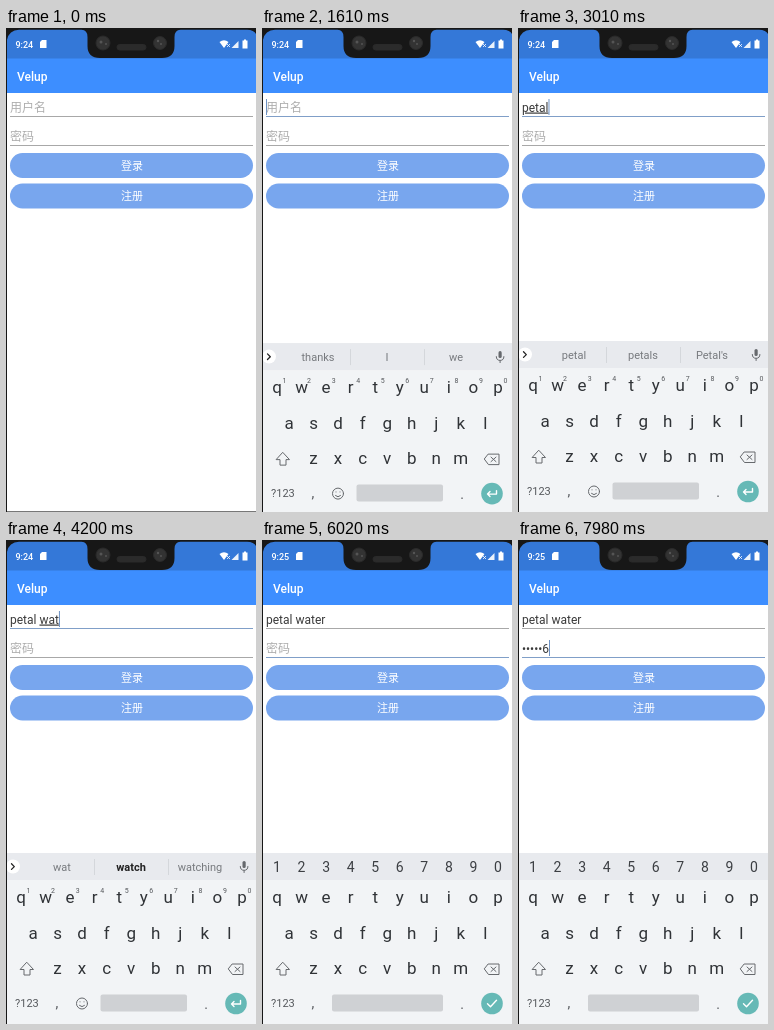
Animation of 250x484 px, one loop 8 s. Source, as an HTML page:

```html
<!DOCTYPE html>
<html lang="zh">
<head>
<meta charset="utf-8">
<style>
  html, body { margin: 0; width: 100%; height: 100%; overflow: hidden; background: #fff; }
  svg { display: block; width: 250px; height: 484px; }
  text { font-family: Roboto, "Noto Sans CJK SC", "Noto Sans CJK", sans-serif; white-space: pre; }
  .mid { text-anchor: middle; }
  .key { font-size: 17px; fill: #303337; }
  .hint { fill: #adadad; }
  .field { font-size: 12px; fill: #3a3a3a; }
  .icon { fill: none; stroke: #66696d; stroke-width: 1; stroke-linejoin: round; stroke-linecap: round; }
  .on { stroke: #fff; stroke-width: 1.4; }
  .composing { text-decoration: underline #777; text-decoration-thickness: 1px; text-underline-offset: 2px; }
</style>
</head>
<body>
<svg viewBox="0 0 250 484">
  <rect width="250" height="484" fill="#fff"/>
  <rect width="250" height="31" fill="#3478d8"/>
  <rect y="30.500" width="250" height="34.500" fill="#3d8eff"/>
  <text x="11" y="53" font-size="12" font-weight="500" fill="#fff">Velup</text>

  <g fill="#fff">
    <text id="clock" x="9.500" y="19.500" font-size="9" font-weight="500"></text>
    <path d="M36 12H40.500V20H34V14Z"/>
    <path d="M213.500 14Q218 10.500 222.500 14L218 20Z"/>
    <path d="M225.500 20L232.500 13V20Z" fill-opacity=".9"/>
    <path d="M236.500 12.500H238V11.500H240V12.500H241.500V20.500H236.500Z"/>
  </g>
  <path d="M221 16l3 3m0-3l-3 3" stroke="#fff" stroke-width=".8"/>

  <text id="name" class="field" x="4" y="83.500"></text>
  <text id="secret" class="field" x="4" y="112.500"></text>
  <path id="nameLine" d="M4 88.500H247"/>
  <path id="secretLine" d="M4 117.500H247"/>
  <path id="caret" stroke="#6d92c4"/>
  <g fill="#78a6ee">
    <rect x="4" y="125" width="243" height="25" rx="12.500"/>
    <rect x="4" y="155.500" width="243" height="25" rx="12.500"/>
  </g>
  <g class="mid" font-size="11" fill="#fff"><text x="126" y="142">登录</text><text x="126" y="172">注册</text></g>
  <path d="M1 483.500H250" stroke="#777"/>

  <g id="keyboard">
    <rect y="313" width="250" height="171" fill="#f2f4f6"/>
    <rect y="313" width="250" height="27" fill="#e8eaee"/>
    <g id="letters"></g>
    <path class="icon" d="M21 422.500L27.500 429.500H24V435H18V429.500H14.500Z"/>
    <path class="icon" d="M226.500 424H237V434.500H226.500L222.500 429.200ZM229 427l5 4.500m0-4.500l-5 4.500"/>
    <text x="9" y="467" font-size="11" fill="#55585c">?123</text>
    <text class="mid" x="51" y="468" font-size="14" fill="#55585c">,</text>
    <text class="mid" x="200" y="468.500" font-size="14" fill="#55585c">.</text>
    <rect id="space" y="454.500" height="17" rx="2" fill="#cfd1d4"/>
    <circle cx="230" cy="463.500" r="10.800" fill="#66b9b6"/>
    <g id="wordMode">
      <g id="hints"></g>
      <circle cx="7" cy="326.500" r="7" fill="#fff"/>
      <path class="icon" d="M5.500 323.800l2.800 2.800-2.800 2.800" style="stroke:#222;stroke-width:1.300"/>
      <path d="M88.500 319V335M162.500 319V335" stroke="#d4d7db"/>
      <g id="words" class="mid" font-size="11" fill="#777a7e"></g>
      <rect x="236.500" y="321" width="3.200" height="7" rx="1.600" fill="#66696d"/>
      <path class="icon" d="M234.300 326.500a3.800 3.800 0 0 0 7.600 0M238.100 330.500V332.500"/>
      <circle class="icon" cx="76" cy="463.500" r="5.500"/>
      <path class="icon" d="M73.500 465.500q2.500 2.500 5 0M74 461.800v.1M78 461.800v.1"/>
      <path class="icon on" d="M234.500 460.500V464H225.500M228 461.500l-2.500 2.500 2.500 2.500"/>
    </g>
    <g id="digitMode">
      <path class="icon on" d="M225.500 463.800l3 3 6-6.500"/>
    </g>
  </g>

  <g fill="#171717">
    <path d="M0 0H250V6Q248 2 241 1.800H174.500Q168.500 2 168.500 9V18Q168.500 30 156 30H94Q81.500 30 81.500 18V9Q81.500 2 75.500 1.800H13Q3 2 1 12V484H0Z"/>
    <g fill="#333" stroke="#2a2a2a">
      <circle cx="97" cy="15" r="7"/><circle cx="154" cy="15" r="6.500"/>
      <rect x="111" y="16.500" width="29" height="5.500" rx="2.700" fill="#2b2b2b"/>
    </g>
    <g fill="#555"><circle cx="95" cy="14" r="1.500"/><circle cx="100" cy="16" r="1"/><circle cx="152" cy="13" r="1.200"/><circle cx="155" cy="16" r="1"/></g>
  </g>
</svg>
<script>
const LOOP = 8000, OPEN = 1500, FOCUS_SECRET = 5200, SWITCH = 5320;
const $ = id => document.getElementById(id);
const pitch = 24.55;

// time, text, suggestions
const typing = [
  [0, '', 'thanks', 'I', 'we'],
  [1960, 'p', 'p', 'please', 'put'],
  [2170, 'pe', 'pe', 'people', 'per'],
  [2450, 'pet', 'pet', 'pets', 'petty'],
  [2620, 'peta', 'peta', 'petal', 'petals'],
  [2830, 'petal', 'petal', 'petals', "Petal's"],
  [3300, 'petal ', 'is', 'and', 'of'],
  [3570, 'petal w', 'w', 'was', 'with'],
  [3790, 'petal wa', 'wa', 'was', 'want'],
  [4060, 'petal wat', 'wat', 'watch', 'watching'],
  [4340, 'petal wate', 'wate', 'water', 'waters'],
  [4620, 'petal water', 'water', 'waters', 'waiter']
];
const corrected = ['peta', 'petal wat', 'petal wate'];
const digitTimes = [6230, 6580, 6900, 7210, 7500, 7840];

const label = (x, y, s, attrs = '') => `<text x="${x}" y="${y}" ${attrs}>${s}</text>`;
const row = (chars, x, y, attrs) => [...chars].map((c, i) => label(x + i * pitch, y, c, attrs)).join('');

$('letters').innerHTML = [['qwertyuiop', 15, 363], ['asdfghjkl', 27, 398.5], ['zxcvbnm', 51.5, 434]]
  .map(([chars, x, y]) => row(chars, x, y, 'class="mid key"')).join('');
$('hints').innerHTML = row('1234567890', 22.5, 352.5, 'class="mid" font-size="7" fill="#55585c"');
$('digitMode').innerHTML += row('1234567890', 15, 332, 'class="mid" font-size="14" fill="#3c3f43"');

function setHTML(id, html) {
  const el = $(id);
  if (el.shown !== html) el.innerHTML = el.shown = html;
}

function setLine(id, focused) {
  $(id).setAttribute('stroke', focused ? '#809fc8' : '#a8a8a8');
  $(id).setAttribute('stroke-width', focused ? 1.2 : 1);
}

function drawKeyboard(t, suggestions, certain) {
  const p = Math.min(1, Math.max(0, (t - OPEN) / 200));
  const digits = t >= SWITCH;
  $('keyboard').style.display = t < OPEN ? 'none' : '';
  $('keyboard').setAttribute('transform', `translate(0 ${24 * (1 - p) ** 3})`);
  $('keyboard').setAttribute('opacity', Math.min(1, p * 2));
  $('wordMode').style.display = digits ? 'none' : '';
  $('digitMode').style.display = digits ? '' : 'none';
  $('space').setAttribute('x', digits ? 70 : 94.5);
  $('space').setAttribute('width', digits ? 111 : 86.5);
  setHTML('words', suggestions.map((s, i) =>
    label(56 + 69 * i, 331, s, certain && i === 1 ? 'font-weight="700" fill="#222"' : '')).join(''));
}

function draw(t) {
  const [typedAt, name, ...suggestions] = typing.findLast(step => step[0] <= t);
  const typed = digitTimes.filter(d => d <= t);
  const inSecret = t >= FOCUS_SECRET, opened = t >= OPEN;

  setHTML('clock', t < 4700 ? '9:24' : '9:25');
  const [first, last] = name.split(' ');
  const composing = s => s && t < SWITCH ? `<tspan class="composing">${s}</tspan>` : s;
  setHTML('name', !name ? '<tspan class="hint">用户名</tspan>'
    : last === undefined ? composing(first) : first + ' ' + composing(last));
  const pressed = inSecret && t < SWITCH;
  setHTML('secret', typed.length ? '•'.repeat(typed.length - 1) + typed.length
    : `<tspan class="hint"${pressed ? ' style="fill:#888"' : ''}>密码</tspan>`);
  setLine('nameLine', opened && t < SWITCH);
  setLine('secretLine', inSecret);

  const since = t - Math.max(OPEN, typedAt, inSecret ? FOCUS_SECRET : 0, ...typed);
  const empty = inSecret ? !typed.length : !name;
  const x = 4.5 + (empty ? 0 : $(inSecret ? 'secret' : 'name').getComputedTextLength());
  $('caret').setAttribute('d', `M${x} ${inSecret ? 100 : 71}v16`);
  $('caret').style.display = opened && since % 1000 < 500 ? '' : 'none';
  drawKeyboard(t, suggestions, corrected.includes(name));
}

const start = performance.now();
function tick() {
  draw((performance.now() - start) % LOOP);
  requestAnimationFrame(tick);
}
tick();
</script>
</body>
</html>
```
